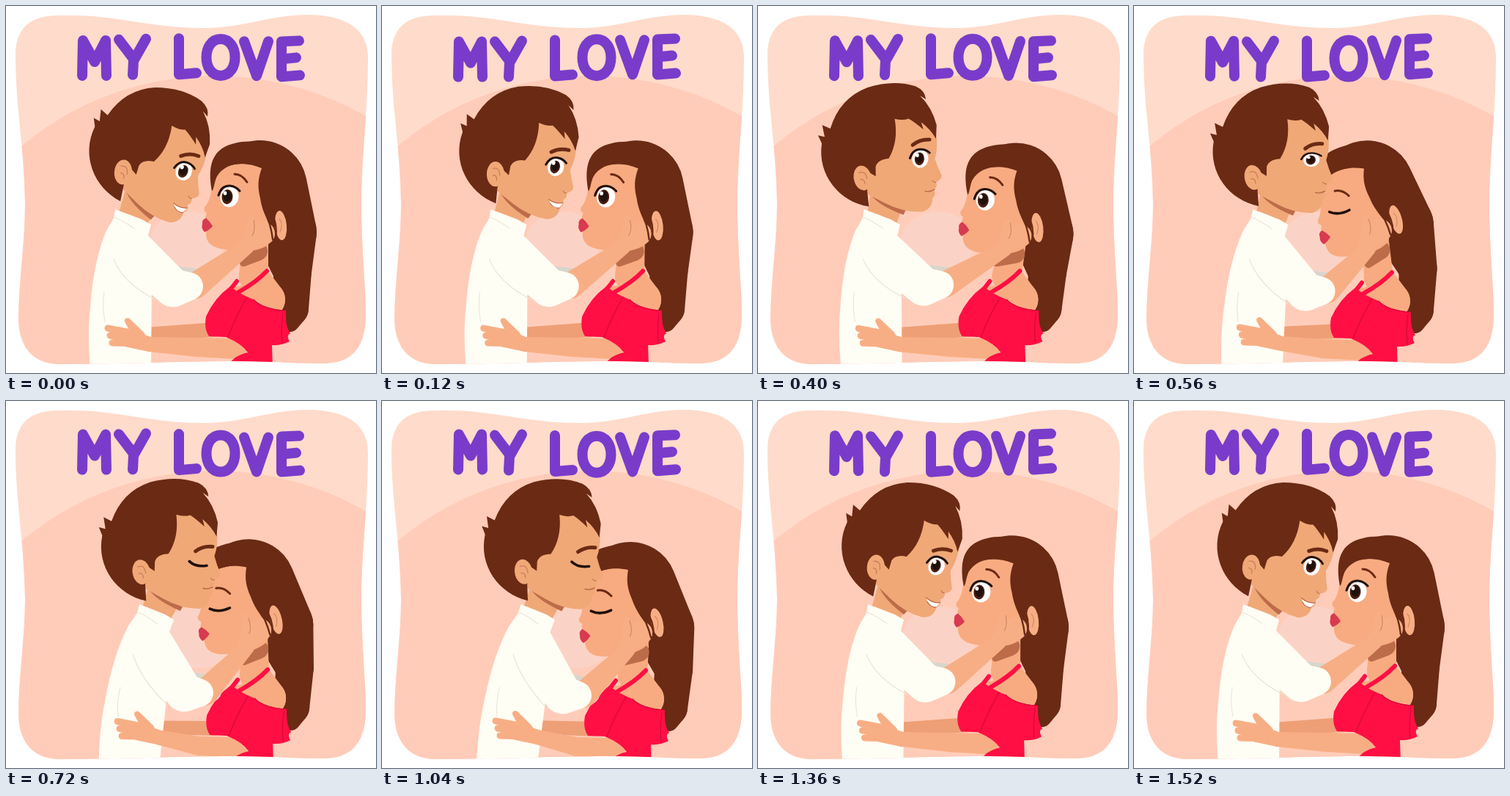
Animation, 505 px wide and 500 px high, one loop 1560 ms. Source, as an HTML page with a canvas:

```html
<!DOCTYPE html>
<html lang="en">
<head>
<meta charset="utf-8">
<title>MY LOVE</title>
<style>
html, body { margin: 0; width: 100%; height: 100%; overflow: hidden; background: #fff; }
canvas { display: block; }
</style>
</head>
<body>
<canvas id="stage" width="505" height="500" role="img" aria-label="MY LOVE"></canvas>
<script>
const ctx = document.getElementById('stage').getContext('2d');
const LOOP = 1560, STEP = 40;
const HAIR = '#6a2a14', MAN = '#f0a877', WOMAN = '#f8ab80', HAND = '#f8ae84', SHADE = '#bd6c4a',
  SHIRT = '#fffef5', GREY = '#d9d5cc', FOLD = '#e9e4d6', RED = '#ff0f43', INK = '#20100c', PURPLE = '#7a3bca';

// his lean and head tilt, her nuzzle and sway; everything else follows from these
const POSES = [
  { at: 0, lean: 0, tilt: 17, nuzzle: 0, sway: 0 },
  { at: 280, lean: -.07, tilt: 0, nuzzle: 0, sway: 3 },
  { at: 360, lean: -.14, tilt: -1, nuzzle: 0, sway: 9 },
  { at: 560, lean: .33, tilt: 1, nuzzle: 1, sway: -18 },
  { at: 720, lean: .82, tilt: 2, nuzzle: .8, sway: -7 },
  { at: 1040, lean: 1, tilt: 3, nuzzle: .75, sway: 0 },
  { at: 1200, lean: .42, tilt: 11, nuzzle: .3, sway: 0 },
  { at: 1400, lean: 0, tilt: 17, nuzzle: 0, sway: 0 }
];
POSES.push({ ...POSES[0], at: LOOP });

const mix = (a, b, u) => a + (b - a) * u;
const blend = (a, b, u) => [mix(a[0], b[0], u), mix(a[1], b[1], u)];
const clamp = v => Math.max(0, Math.min(1, v));
const rad = a => a * Math.PI / 180;

// monotone cubic interpolation
function slope(i, key) {
  if (i < 1 || i >= POSES.length - 1) return 0;
  const d = j => (POSES[j + 1][key] - POSES[j][key]) / (POSES[j + 1].at - POSES[j].at);
  const a = d(i - 1), b = d(i);
  return a * b <= 0 ? 0 : 2 * a * b / (a + b);
}
function value(key, t) {
  let i = 0;
  while (t >= POSES[i + 1].at) i++;
  const a = POSES[i], b = POSES[i + 1], h = b.at - a.at, u = (t - a.at) / h;
  return mix(a[key], b[key], u * u * (3 - 2 * u)) +
    h * u * (1 - u) * ((1 - u) * slope(i, key) - u * slope(i + 1, key));
}
function pose(t) {
  const [lean, tilt, nuzzle, sway] = ['lean', 'tilt', 'nuzzle', 'sway'].map(key => value(key, t));
  return {
    lean,
    smile: tilt / 17,
    man: { x: 148 + 43 * lean + .7 * tilt, y: 234 - .45 * tilt, angle: tilt, px: 144, py: 233 },
    woman: { x: 375 + sway, y: 295 + 3 * lean + .5 * sway, angle: -14 * nuzzle, px: 375, py: 295 },
    body: { x: .3 * sway + 4 * lean, y: 6 * Math.max(0, lean), angle: 0, px: 0, py: 0 },
    eyeM: clamp((.75 - lean) / .6 + tilt / 30),
    eyeW: clamp((.7 - nuzzle) / .45)
  };
}

function fill(d, color) {
  ctx.fillStyle = color;
  ctx.fill(new Path2D(d));
}
function line(d, color, w) {
  ctx.strokeStyle = color;
  ctx.lineWidth = w;
  ctx.stroke(new Path2D(d));
}
function oval(x, y, rx, ry, color, a = 0) {
  ctx.fillStyle = color;
  ctx.beginPath();
  ctx.ellipse(x, y, rx, ry, a, 0, 7);
  ctx.fill();
}
// hull of two circles
function limb([ax, ay], ra, [bx, by], rb, color) {
  const dir = Math.atan2(by - ay, bx - ax);
  const phi = Math.acos(Math.max(-1, Math.min(1, (ra - rb) / Math.hypot(bx - ax, by - ay))));
  ctx.beginPath();
  ctx.arc(ax, ay, ra, dir + phi, dir - phi + 2 * Math.PI);
  ctx.arc(bx, by, rb, dir - phi, dir + phi);
  ctx.fillStyle = color;
  ctx.fill();
}
function chain(color, ...joints) {
  joints.slice(1).forEach(([p, r], i) => limb(joints[i][0], joints[i][1], p, r, color));
}
function place(f, draw) {
  ctx.save();
  ctx.translate(f.x, f.y);
  ctx.rotate(rad(f.angle));
  ctx.translate(-f.px, -f.py);
  draw();
  ctx.restore();
}
function point(f, x, y) {
  const c = Math.cos(rad(f.angle)), s = Math.sin(rad(f.angle));
  x -= f.px; y -= f.py;
  return [f.x + x * c - y * s, f.y + x * s + y * c];
}
function shift(x, y, draw) {
  place({ x, y, angle: 0, px: 0, py: 0 }, draw);
}

const PANEL = 'M13 66C13 32 32 13 70 13C150 10 190 30 270 30C325 30 360 12 412 12C462 12 494 30 494 70' +
  'C494 150 485 200 485 275C486 350 492 390 491 426C489 468 470 487 432 487C390 487 340 483 290 484' +
  'C220 485 130 488 72 488C36 487 17 464 17 424C18 370 26 320 26 270C25 190 13 140 13 66Z';

const LETTERS = [
  'M104 95L105 47L121 76L136 47L137 95',
  'M154 47L173 72M191 46L174 76L173 95',
  'M236 46L236 95L260 93',
  'M293 46C319 46 319 96 293 96C267 96 267 46 293 46Z',
  'M325 48L342 95L358 48',
  'M400 46L376 47L376 95L401 93M376 71L396 69'
];
function title(t) {
  LETTERS.forEach((d, i) => shift(0, 1.7 * Math.sin(2 * Math.PI * (t / 390 - .13 * i)),
    () => line(d, PURPLE, 14)));
}

function eye(x, y, open, size, look, lash, shut) {
  if (open < .2) return line(shut, INK, 3.6);
  ctx.save();
  ctx.translate(x, y);
  ctx.scale(1, open);
  ctx.translate(-x, -y);
  oval(x, y, size, size * 1.12, '#fff', .2);
  oval(x + look, y, size * .6, size * .8, '#4a1d12', .1);
  oval(x + look, y - 1, size * .45, size * .6, INK);
  oval(x + look - 3, y - 5, 2.4, 2.8, '#fff');
  line(lash, INK, 3);
  ctx.restore();
}

function manHead({ eyeM, smile }) {
  const dip = 1 - eyeM;
  fill('M152 250Q158 268 199 284L204 274Z', SHADE);
  fill('M190 140L236 146L245 172Q248 192 243 208Q247 221 252 231Q252 237 244 240Q247 246 241 250' +
    'Q245 256 239 262Q239 276 225 280Q200 281 175 268L150 255L150 212Z', MAN);
  fill('M152 272C112 265 82 228 89 185L84 174L93 176L90 160L101 165Q114 124 152 110' +
    'Q188 99 218 109Q231 115 232 127L224 122Q240 138 246 162L245 181Q238 168 225 158L228 168' +
    'Q215 157 208 153Q200 156 189 153Q194 184 180 207Q165 208 162 218L162 231L154 226L150 250Z', HAIR);
  oval(144, 233, 12, 17, MAN, -.2);
  line('M139 226Q148 222 150 234M141 235Q147 234 147 241', '#cb7e58', 1.3);
  eye(223, 208, eyeM, 11, -1, 'M209 207Q213 195 223 195Q231 195 236 200', 'M209 216Q218 224 233 221');
  shift(4 * dip, 13 * dip, () => line('M213 189Q223 181 236 182', HAIR, 5));
  line('M244 240Q241 241 239 238', '#c97a55', 1.3);
  if (smile > .55) {
    fill('M223 254Q233 258 242 254Q238 264 232 263Q226 261 223 254Z', '#fff');
    line('M222 253Q232 258 242 254M225 258Q231 264 238 262', SHADE, 1.2);
  } else {
    line('M229 252Q235 254 242 250', SHADE, 1.5);
  }
}

function womanFace({ eyeW }) {
  const dip = 1 - eyeW;
  fill('M281 245C283 225 300 208 350 218L366 300L358 325C342 337 315 335 300 332C285 330 274 325 273 312' +
    'L272 288L274 282Q269 279 271 274Q279 266 281 245Z', WOMAN);
  fill('M273 289Q267 291 268 297Q266 303 271 308Q278 305 282 300Q278 293 273 289Z', '#d83a50');
  eye(305, 260, eyeW, 12.5, -3, 'M290 258Q294 244 306 245Q314 246 319 252', 'M289 267Q300 275 316 271');
  shift(-9 * dip, 12 * dip, () => line('M312 229Q322 229 329 240', HAIR, 3));
  fill('M281 252C276 225 279 205 295 194C320 178 370 182 395 208L402 300L366 322C364 300 350 285 347 262' +
    'C343 245 344 235 349 221C325 211 300 213 288 232C284 240 284 250 281 252Z', HAIR);
}

function manHand() {
  oval(375, 299, 8, 20, HAND, -.1);
  limb([328, 326], 10, [351, 310], 16, HAND);
  limb([331, 318], 8, [334, 290], 4, HAND);
  line('M338 292Q341 305 336 313M373 290Q379 296 374 308', '#cf8560', 1.1);
  line('M352 276Q362 298 364 318M362 280Q371 297 368 316', HAIR, 2.4);
}

function people(p) {
  const k = p.lean;
  const torso = (x, y) => [x + k * (15 + 25 * (487 - y) / 207), y];
  const arm = (x, y) => [x + 17 * k, y + 19 * k];
  const grip = (x, y) => [x + 16 * k, y - 3 * k];
  const his = (x, y) => point(p.man, x, y);
  const hers = (x, y) => point(p.woman, x, y);
  const body = (x, y) => point(p.body, x, y);

  oval(247 + 18 * k, 322, 50, 42, '#fbd3c6');

  // far arm, his neck and shirt
  limb(grip(190, 447), 9, body(285, 441), 10, '#ee9f76');
  limb(his(178, 258), 24, torso(174, 288), 21, MAN);
  ctx.save();
  const shear = 25 * k / 207;
  ctx.transform(1, 0, -shear, 1, 15 * k + shear * 487, 0);
  fill('M149 277Q160 281 186 291L198 298L193 317Q201 335 199 365L198 495L115 495Q111 445 115 410' +
    'Q120 345 137 306L147 289Z', SHIRT);
  line('M148 288Q165 294 193 317M134 390Q131 410 135 430', FOLD, 1.1);
  ctx.restore();

  // woman
  chain(HAIR, [hers(347, 247), 64], [hers(382, 308), 42],
    [blend(body(391, 362), hers(391, 362), .4), 26], [body(389, 412), 24], [body(387, 430), 14]);
  chain(WOMAN, [hers(340, 325), 18], [body(338, 368), 20], [body(356, 400), 25], [body(318, 402), 20]);
  limb(body(324, 350), 5, hers(344, 334), 13, SHADE);
  chain(HAND, [grip(168, 453), 12], [grip(196, 461), 10], [body(262, 465), 13], [body(315, 467), 14]);
  for (let i = 0; i < 3; i++) limb(grip(168, 446 + 6 * i), 6, grip(139 + 3 * i, 439 + 10 * i), 4.5, HAND);
  limb(grip(182, 450), 8, grip(166, 429), 4, HAND);
  place(p.body, () => {
    fill('M306 382Q284 398 273 423Q270 440 277 450L300 451Q322 460 330 472Q305 478 303 495L364 495' +
      'L363 462Q376 463 387 457Q382 449 388 446Q381 437 382 415Q350 412 338 400Q320 393 306 382Z', RED);
    line('M308 384L315 375M317 390Q342 376 356 361', RED, 6);
    line('M329 397Q314 422 303 451M378 418Q375 440 377 459M338 400Q350 413 381 415', '#d70839', 1.2);
  });
  place(p.woman, () => womanFace(p));

  place(p.man, () => manHead(p));

  // his near arm
  const elbow = blend(torso(228, 384), arm(228, 384), .85);
  limb([elbow[0] + 1, elbow[1] - 4], 26, arm(262, 377), 19, GREY);
  chain(HAND, [arm(258, 381), 18], [hers(329, 328), 10]);
  chain(SHIRT, [torso(172, 332), 29], [elbow, 26], [arm(250, 382), 19]);
  const [a, b, c] = [torso(147, 345), torso(160, 378), elbow.map((v, i) => v - 24 + 40 * i)];
  line(`M${a}Q${b} ${c}`, FOLD, 1.1);
  place({ ...p.woman, angle: p.woman.angle * .7 }, manHand);
}

function draw(t) {
  ctx.fillStyle = '#fff';
  ctx.fillRect(0, 0, 505, 500);
  ctx.lineCap = ctx.lineJoin = 'round';
  ctx.save();
  ctx.clip(new Path2D(PANEL));
  ctx.fillStyle = '#ffdbcb';
  ctx.fillRect(0, 0, 505, 500);
  oval(285, 506, 411, 411, '#ffccb9');
  people(pose(t));
  ctx.restore();
  title(t);
}

const start = performance.now();
function tick() {
  const t = (performance.now() - start) % LOOP;
  draw(Math.floor(t / STEP) * STEP);
  requestAnimationFrame(tick);
}
tick();
</script>
</body>
</html>
```
